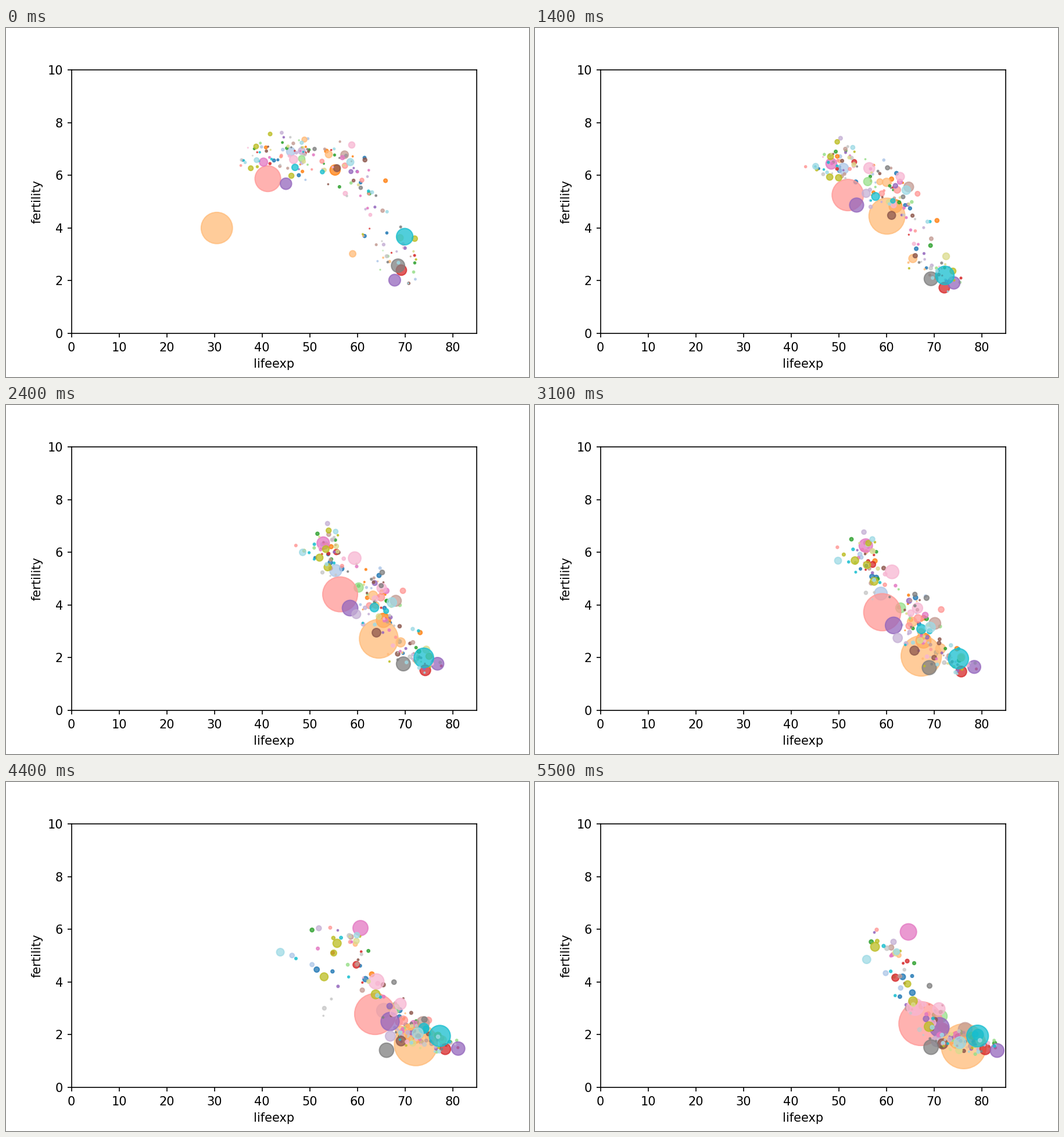
A matplotlib script for the animation above (5.6 s loop, 900x600 px).

```python
import numpy as np
import matplotlib.pyplot as plt
from matplotlib.animation import FuncAnimation

FRAMES = 56
SLOTS, PER_SLOT = 20, 9
rng = np.random.default_rng(11)
t = np.arange(FRAMES) / (FRAMES - 1)
bubbles = []  # (colour slot, x, y, size), each track one value per frame


def logistic(v):
    return 1 / (1 + np.exp(-v))


def add(slot, size, start, end, mid, bend=0.8, dip=(0, 0), shock=(0, 0.036)):
    """Bubble going from start to end.

    Fertility falls in an S-curve around time mid, and growth in size slows
    the earlier that happens. A shock, given as its depth and its peak time
    and width, lowers the path by dip for a while.
    """
    fall = logistic((t - mid) / (0.1 + 0.17 * mid))
    fall = (fall - fall[0]) / (fall[-1] - fall[0])
    bump = np.exp(-((t - shock[0]) / shock[1]) ** 2)
    x = start[0] + (end[0] - start[0]) * t ** bend - dip[0] * bump
    y = start[1] + (end[1] - start[1]) * fall - dip[1] * bump
    slow = max(0, 0.5 - mid)
    grow = t * (1 + slow * (1 - t))
    bubbles.append((slot, x, y, size[0] + (size[1] - size[0]) * grow))


def add_random(slot):
    """Bubble whose ends lie near the shared curves: poor, middle or rich."""
    group = rng.choice(3, p=[0.34, 0.38, 0.28])
    x0 = rng.uniform(*[(35, 50), (47, 63), (61, 73)][group])
    x1 = rng.uniform(*[(57, 71), (68, 79), (71, 83)][group])
    y0 = 2.3 + 4.5 * logistic((63.5 + rng.normal(0, 2.5) - x0) / 2.2)
    y1 = 1.55 + 4.2 * logistic((65.5 + rng.normal(0, 2) - x1) / 3.2)
    y0 += rng.normal(0, 0.45)
    y1 += rng.normal(0, 0.2)
    mid = rng.uniform(*[(0.55, 0.85), (0.25, 0.6), (0.05, 0.4)][group])

    pop = np.clip(rng.lognormal(0.8, 1.3), 0.05, 32)
    growth = rng.uniform(*[(2.8, 4.2), (2, 3.5), (1.1, 1.7)][group])
    dip = rng.uniform(5, 13) if group == 0 and rng.random() < 0.3 else 0
    add(slot, (pop, pop * growth), (x0, max(y0, 1.9)), (x1, max(y1, 1.25)),
        mid, dip=(dip, 0), shock=(0.8, 0.15))


# The largest bubbles, in drawing order within each colour
add(1, (48, 161), (46, 6.9), (71.5, 2.15), 0.57, bend=1.2)
add(2, (72, 206), (55.3, 6.2), (75, 1.8), 0.33)
add(3, (667, 1372), (52, 6.9), (76.2, 1.56), 0.23, dip=(21.5, 2.9))
add(5, (27, 92), (48.3, 6.63), (71.5, 2.7), 0.42)
add(6, (73, 81), (69.2, 2.4), (80.7, 1.45), 0.1, bend=1)
add(7, (450, 1311), (41.2, 5.87), (67.2, 2.42), 0.48, bend=0.65)
add(8, (88, 258), (45, 5.68), (71.1, 2.28), 0.4)
add(8, (93, 127), (67.8, 2.02), (83.2, 1.4), 0.5, bend=0.65)
add(11, (39, 127), (57.3, 6.78), (76.5, 2.2), 0.37, bend=0.7)
add(12, (45, 182), (40.3, 6.5), (64.6, 5.9), 0.7)
add(13, (45, 189), (46.6, 6.6), (66, 3.05), 0.75, bend=0.5)
add(13, (26, 101), (58.8, 7.15), (71, 2.98), 0.35)
add(14, (120, 143), (68.5, 2.57), (71, 1.6), 0.2, dip=(4.5, 0.2),
    shock=(0.8, 0.2))
add(18, (27, 78), (46.9, 6.3), (79.2, 2), 0.38)
add(18, (186, 322), (69.9, 3.67), (79.1, 1.95), 0, bend=1)
add(19, (33, 92), (58.5, 6.5), (75.4, 1.7), 0.42)

named = [b[0] for b in bubbles]
for slot in range(SLOTS):
    for _ in range(PER_SLOT - named.count(slot)):
        add_random(slot)
bubbles.sort(key=lambda b: b[0])
slots, xs, ys, sizes = (np.array(part) for part in zip(*bubbles))

fig, ax = plt.subplots(figsize=(6, 4), dpi=150)
fig.subplots_adjust(left=0.125, right=0.9, bottom=0.125, top=0.88)
ax.set(xlim=(0, 85), ylim=(0, 10), xlabel="lifeexp", ylabel="fertility")
dots = ax.scatter(xs[:, 0], ys[:, 0], s=sizes[:, 0], c=slots, cmap="tab20",
                  vmin=0, vmax=SLOTS - 1, alpha=0.75)


def draw(i):
    dots.set_offsets(np.column_stack([xs[:, i], ys[:, i]]))
    dots.set_sizes(sizes[:, i])
    return (dots,)


anim = FuncAnimation(fig, draw, frames=FRAMES, interval=100,
                     repeat=True, repeat_delay=0)
plt.show()
```
